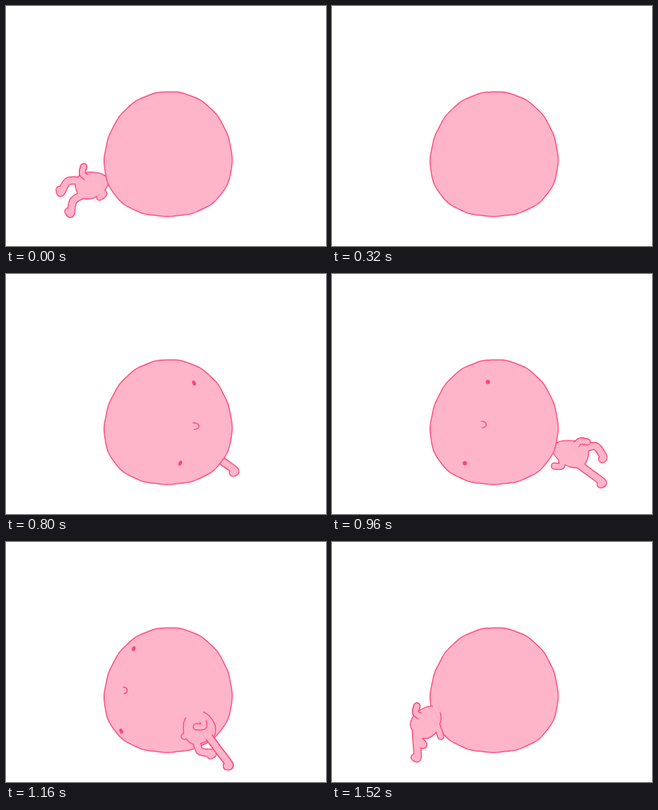
Recreate the animation shown at these times as an HTML page with a canvas. Size 400 px wide and 300 px high, loop 1560 ms.

```html
<!DOCTYPE html>
<html lang="en">
<head>
<meta charset="utf-8">
<title>Big head runner</title>
<style>
html, body { margin: 0; width: 100%; height: 100%; overflow: hidden; background: #fff; }
canvas { display: block; width: 400px; height: 300px; }
</style>
</head>
<body>
<canvas id="stage" width="400" height="300"></canvas>
<script>
const ctx = document.getElementById('stage').getContext('2d');
const { PI, sin, cos, sqrt, min, max, hypot, floor } = Math;
const LOOP = 1560, STEP = 40, LINE = 1.25;
const PINK = '#ffb5c9', INK = '#ff447a';
const CX = 202, CY = 184.5;
const ARM = { width: 6.5, half: 9 }, LEG = { width: 8, half: 16 };

const clamp = (v, lo, hi) => max(lo, min(hi, v));
const mix = (a, b, k) => a.map((v, i) => v + (b[i] - v) * k);
const move = (p, dir, d) => [p[0] + dir[0] * d, p[1] + dir[1] * d];
const across = ([x, y]) => [-y, x];

function direction(a, b) {
  const d = hypot(b[0] - a[0], b[1] - a[1]) || 1;
  return [(b[0] - a[0]) / d, (b[1] - a[1]) / d, d];
}

// Smooth open curve through a list of points
function curve(pts) {
  const at = i => pts[clamp(i, 0, pts.length - 1)];
  const path = new Path2D();
  path.moveTo(...pts[0]);
  for (let i = 0; i < pts.length - 1; i++) {
    const [a, b, c, d] = [at(i - 1), at(i), at(i + 1), at(i + 2)];
    path.bezierCurveTo(
      b[0] + (c[0] - a[0]) / 6, b[1] + (c[1] - a[1]) / 6,
      c[0] - (d[0] - b[0]) / 6, c[1] - (d[1] - b[1]) / 6, c[0], c[1]);
  }
  return path;
}

function stroke(path, color, width) {
  ctx.strokeStyle = color;
  ctx.lineWidth = width;
  ctx.stroke(path);
}

// A circle, heavier below and slightly uneven like a drawn line
function makeHead() {
  const path = new Path2D();
  for (let i = 0; i < 180; i++) {
    const a = i * PI / 90;
    const r = 79.5 + 2.6 * sin(a) + .8 * cos(a) + 2.1 * sin(3 * a) - .5 * sin(2 * a)
      + .7 * cos(2 * a) - .9 * cos(4 * a) + .3 * sin(17 * a);
    path.lineTo(CX + r * cos(a), CY + r * sin(a));
  }
  path.closePath();
  return path;
}
const head = makeHead();

// Key points: neck, hip, near hand, far hand, near foot, far foot
const pose = (time, text) => ({ time, pts: text.split(' ').map(p => p.split(',').map(Number)) });
const poses = [
  pose(960, '278,217 319,231 319,210 278,240 339,228 338,260'),
  pose(1160, '236,217 247,250 238,231 223,243 279,278 258,264'),
  pose(1320, '180,214 180,248 172,232 198,233 192,263 194,284'),
  pose(1520, '130,210 106,240 106,205 136,243 107,269 114,253'),
  pose(1560, '126,218 88,229 97,201 117,239 69,233 81,259')
];

function poseAt(time) {
  const t = clamp(time, 960, 1560);
  const i = max(1, poses.findIndex(p => p.time >= t));
  const a = poses[i - 1], b = poses[i];
  const k = (t - a.time) / (b.time - a.time);
  // Slide out from behind the head on the right, back behind it on the left
  const slide = time < 960 ? [.325, .09] : [.225, -.06];
  return a.pts.map((p, j) => move(mix(p, b.pts[j], k), slide, time - t));
}

// Two equal bones; the joint sits beside the line from root to tip
function bones(root, tip, half, bend) {
  const dir = direction(root, tip), d = dir[2];
  const out = min(d * .6, sqrt(max(0, half * half - d * d / 4)));
  return [root, move(mix(root, tip, .5), across(dir), out * bend), tip];
}

function leg(root, foot, bend) {
  const toe = move(foot, across(direction(root, foot)), 3.5);
  return [...bones(root, foot, LEG.half, bend), toe];
}

function drawBody(time) {
  const [neck, hip, handA, handB, footA, footB] = poseAt(time);
  const phase = clamp((time - 960) / 600, 0, 1) * PI;
  const facing = sin(phase), side = -cos(.85 * phase);
  const dir = direction(neck, hip), perp = across(dir), length = dir[2];
  const width = 16 + 4 * facing, neckWidth = 5 + 8 * facing;
  const local = (u, v) => move(move(neck, dir, u * length), perp, v);

  const flank = s => [[0, neckWidth], [.2, (neckWidth + width) / 2 + 1], [.6, width], [.95, width * .6]]
    .map(([u, v]) => local(u, s * v));
  const torso = curve([...flank(1), ...flank(-1).reverse()]);

  const hipA = local(.8, side * width * .6), hipB = local(.8, -side * width * .6);
  const tuck = time < 960 || time > 1560 ? .6 * sin((time % 600 - 360) / 320 * PI) ** 2 : 0;
  const bend = clamp((time - 1060) / 100, -1, 1);
  const limb = (kind, pts) => ({ width: kind.width, root: pts[0], path: curve(pts) });
  const armA = limb(ARM, bones(local(.55 - .4 * facing, side * width * .62), handA, ARM.half, -1));
  const armB = limb(ARM, bones(local(.3, -side * width * .65), handB, ARM.half, -1));
  const legA = limb(LEG, leg(hipA, mix(footA, hipA, tuck), bend));
  const legB = limb(LEG, leg(hipB, footB, bend));
  const limbs = [armB, legB, legA, armA];

  stroke(torso, INK, LINE * 2);
  limbs.forEach(l => stroke(l.path, INK, l.width + LINE * 2));
  ctx.fillStyle = PINK;
  ctx.fill(torso);
  limbs.forEach(l => stroke(l.path, PINK, l.width));

  // Limbs nearest the viewer keep their outline, open at the joint
  for (const l of facing > .7 ? [legA, armA] : [armA]) {
    stroke(l.path, INK, l.width + LINE * 2);
    ctx.beginPath();
    ctx.arc(...l.root, l.width / 2 + LINE + .3, 0, 7);
    ctx.fill();
    stroke(l.path, PINK, l.width);
  }
}

// Features ride on a turning ball
function drawFace(t) {
  const d = t - 960;
  const angle = -9 - .194 * d + .000156 * d * d;
  const sway = -20 + 8 * (d / 180) ** 2;
  const across = (radius, degrees) => CX + radius * sin(degrees * PI / 180);
  const turn = clamp((angle + 9) / 35, -1.2, 1.2), thin = min(1, turn * turn);
  const eye = (x, y, tilt) => {
    ctx.beginPath();
    ctx.ellipse(x, y, 2.7 - .6 * thin, 2.7 + .6 * thin, tilt * turn, 0, 7);
    ctx.fill();
  };
  ctx.save();
  ctx.clip(head);
  ctx.fillStyle = INK;
  eye(across(68, angle + 3), 135 - d * .008, -.45);
  eye(across(74, angle + sway), 236.5, .4);
  const nose = new Path2D();
  const x = across(80, angle), y = 188 - d * .013, w = 3.4 + .8 * turn;
  nose.moveTo(x - w * .8, y - 4);
  nose.bezierCurveTo(x + w * 1.5, y - 4, x + w * 1.5, y + 4, x - w * .5, y + 4.2);
  stroke(nose, INK, LINE);
  ctx.restore();
}

function draw(t) {
  const time = t < 640 ? t + LOOP : t;
  const inFront = time >= 1000 && time < LOOP;
  const behind = !inFront && time > 720 && time < LOOP + 320;

  ctx.fillStyle = '#fff';
  ctx.fillRect(0, 0, 400, 300);
  ctx.lineCap = ctx.lineJoin = 'round';
  if (behind) drawBody(time);
  ctx.fillStyle = PINK;
  ctx.fill(head);
  stroke(head, INK, LINE);
  if (time < 1280) drawFace(time);
  if (inFront) drawBody(time);
}

const start = performance.now();
function tick() {
  const t = (performance.now() - start) % LOOP;
  draw(floor(t / STEP) * STEP);
  requestAnimationFrame(tick);
}
tick();
</script>
</body>
</html>
```
